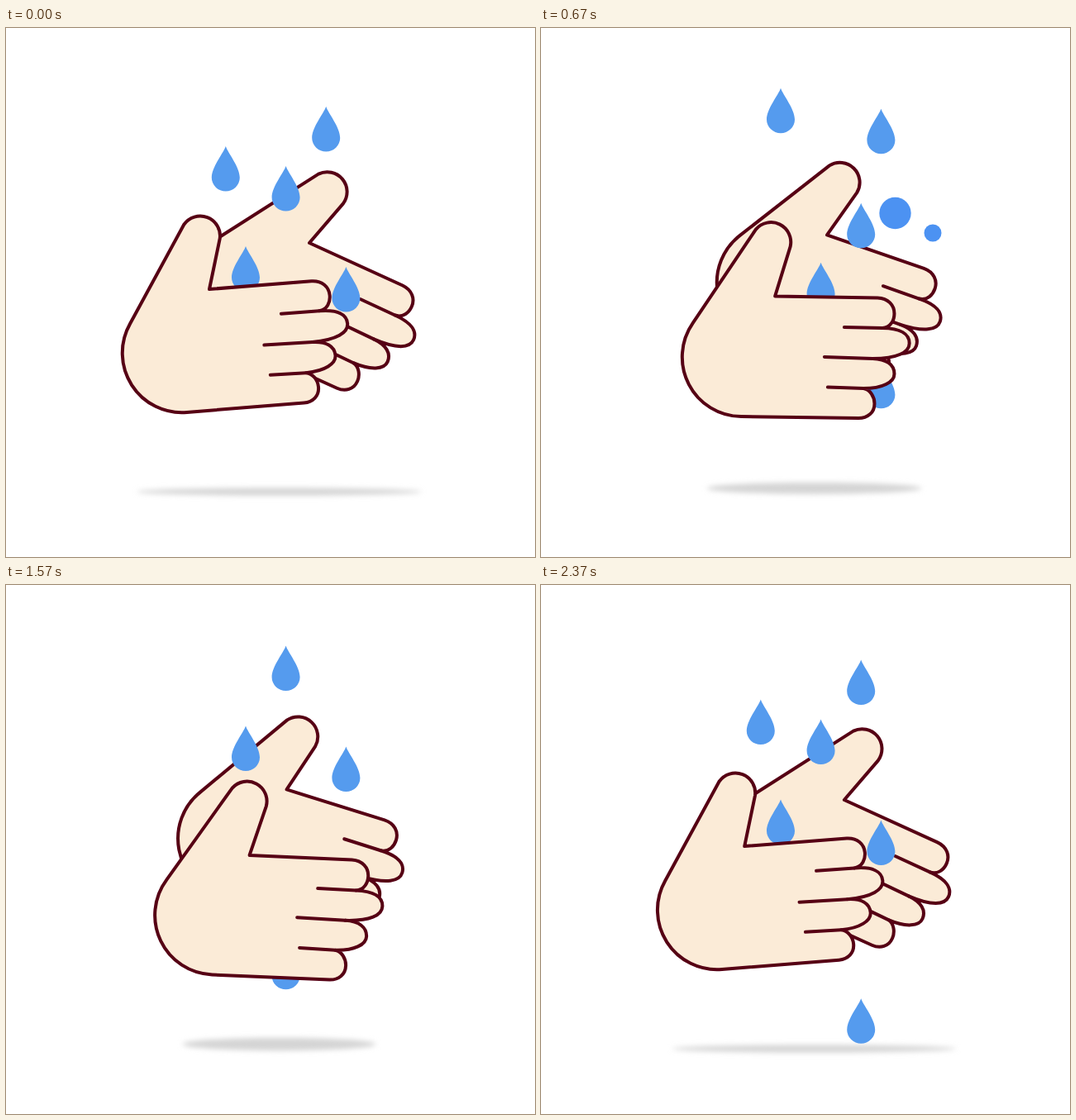
Animation, 640 px wide and 640 px high, one loop 2.41 s. Source, as an HTML page:

```html
<!DOCTYPE html>
<html lang="en">
<head>
<meta charset="utf-8">
<title>Washing hands</title>
<style>
  html, body { margin: 0; width: 100%; height: 100%; overflow: hidden; background: #fff; }
  svg { display: block; width: 100%; height: 100%; }
  .hand { fill: #fbebd7; stroke: #560014; stroke-width: 4; stroke-linecap: round; stroke-linejoin: round; }
</style>
</head>
<body>
<svg viewBox="0 0 640 640">
  <defs>
    <filter id="blur" filterUnits="userSpaceOnUse" x="100" y="520" width="460" height="80">
      <feGaussianBlur stdDeviation="3"/>
    </filter>
    <clipPath id="water"><rect y="57" width="640" height="520"/></clipPath>
    <path id="drop" d="M0 0C2.500 8 17 25 17 38A17 16.500 0 0 1 -17 38C-17 25 -2.500 8 0 0Z"/>
    <!-- origin at the notch between thumb and index finger -->
    <g id="hand" transform="translate(-284 -324)">
      <path d="M284 324L302.500 264A24 24 0 0 0 260.800 243.200L184.600 356.500A72 72 0 0 0 243 469.700
        L385 471.700C396 471.700 404.300 465 404.300 454C404.300 446 399 437 391 435.700C414 435.700 428.300 428 428.300 418
        C428.300 407 419 400 402 399.500C432 399.500 446.500 392 446.500 381C446.500 370 436 363 414 362.700
        C424 362 428.300 353 428.300 345C428.300 335 421 326.500 408 326Z"/>
      <path fill="none" d="M367.700 361.700L414 362.700M343.700 397.500L402 399.500M347.700 434.200L391 435.700"/>
    </g>
  </defs>
  <ellipse id="shadow" cx="330.500" fill="#d4d4d4" filter="url(#blur)"/>
  <g id="bubbles" fill="#4c92f2"></g>
  <use id="back" class="hand" href="#hand"/>
  <g id="drops" fill="#559bee" clip-path="url(#water)"></g>
  <use id="front" class="hand" href="#hand"/>
</svg>
<script>
const LOOP = 2410, STEPS = 60;
const $ = id => document.getElementById(id);
const clamp = v => Math.max(0, Math.min(1, v));
const mix = (a, b, p) => a + (b - a) * p;

function add(parent, tag, attrs = {}) {
  const el = document.createElementNS('http://www.w3.org/2000/svg', tag);
  set(el, attrs);
  return $(parent).appendChild(el);
}
function set(el, attrs) {
  for (const key in attrs) el.setAttribute(key, attrs[key]);
}

// Each column has a drop leaving its place and a slower one arriving there.
const drops = [[265.8, 143], [290, 264], [338.6, 167], [387.2, 95], [411.4, 289]]
  .flatMap(([x, y]) => [
    { x, top: k => y + 6.867 * k },
    { x, top: k => y - 4.45 * (STEPS - k) }
  ]);
drops.forEach(d => d.el = add('drops', 'use', { href: '#drop' }));

const bubbles = [
  { x: 428.5, y: 224, r: 31, start: 14, life: 14 },
  { x: 474, y: 248, r: 17, start: 14, life: 14 },
  { x: 187, y: 197, r: 38.5, start: 30, life: 9 }
];
bubbles.forEach(b => b.el = add('bubbles', 'circle', { cx: b.x, cy: b.y }));

function pose(id, x, y, angle) {
  set($(id), { transform: `translate(${x} ${y}) rotate(${angle})` });
}

function draw(k) {
  const s = 1 - Math.abs(k / 30 - 1);
  const p = s * s * (3 - 2 * s);

  pose('front', mix(246, 308, p), mix(316, 330, p), mix(-5.4, 3.6, p));
  pose('back', mix(367, 332, p), mix(260, 244, p), mix(23.6, 14.4, p));

  set($('shadow'), { cy: mix(561, 554, p), rx: mix(172, 102, p), ry: mix(4.5, 8.5, p) });

  for (const d of drops) {
    const y = d.top(k);
    set(d.el, {
      transform: `translate(${d.x} ${y})`,
      opacity: Math.min(clamp((y - 50) / 4.8), clamp((522 - y) / 14))
    });
  }
  for (const b of bubbles) {
    const u = clamp((k - b.start) / b.life);
    set(b.el, { r: b.r * (1 - (1 - u) ** 4), opacity: clamp(2 - 2 * u) });
  }
}

// The motion advances in 60 discrete steps per loop.
const begin = performance.now();
function tick() {
  const t = (performance.now() - begin) % LOOP;
  draw(Math.min(STEPS - 1, Math.floor((t + 10) / 40)));
  requestAnimationFrame(tick);
}
tick();
</script>
</body>
</html>
```
